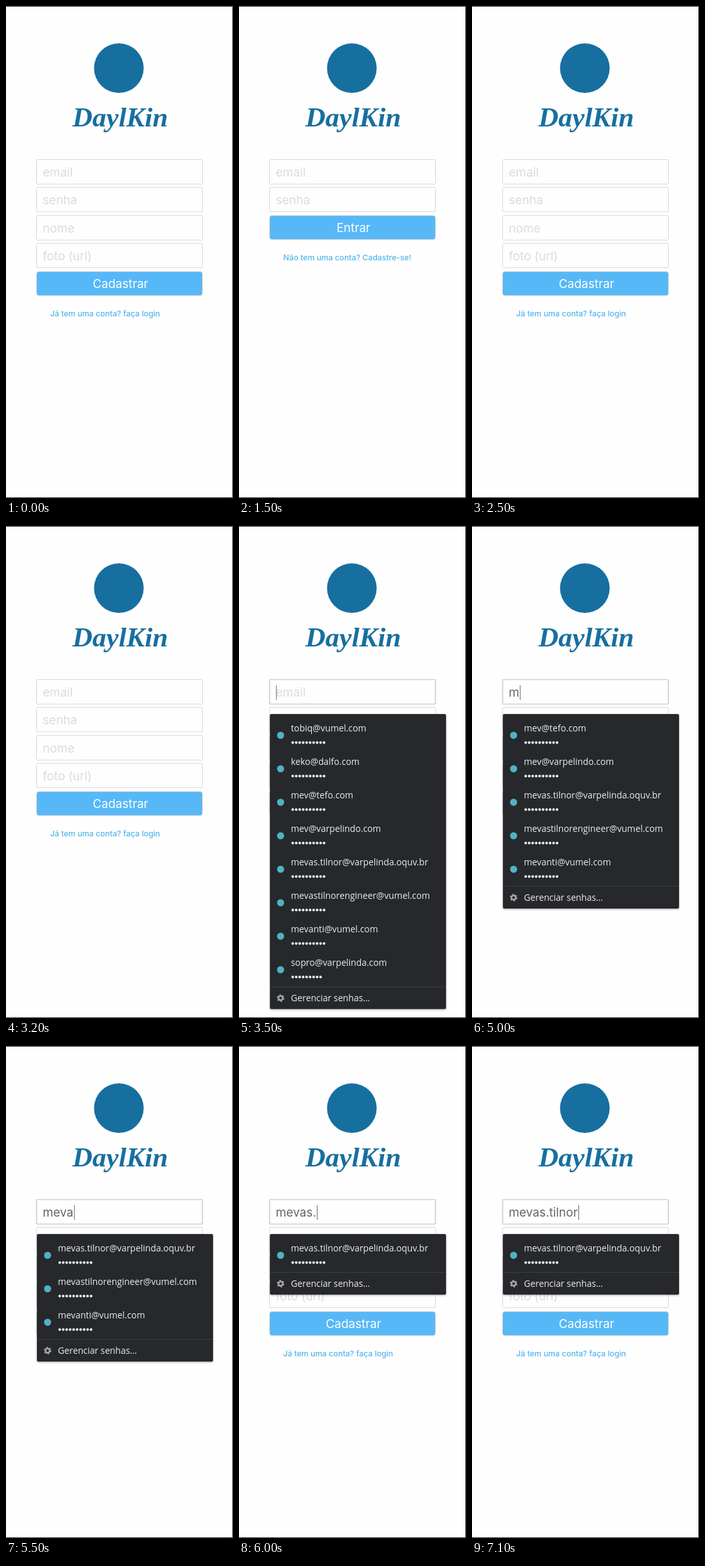
An HTML page for the animation above (8000 ms loop, 352x764 px).

```html
<!DOCTYPE html>
<html lang="pt-BR">
<head>
<meta charset="utf-8">
<title>Cadastro</title>
<style>
  html, body { margin: 0; width: 100%; height: 100%; overflow: hidden; background: #fefefe; }
  svg { display: block; width: 100%; height: 100%; }
  text { white-space: pre; }
  .wordmark { font: italic bold 43px "Liberation Serif", serif; fill: #176f9f; }
  .field { fill: #fefefe; stroke: #d9d9d9; }
  .field.focus { stroke: #cfcfcf; stroke-width: 1.7; }
  .ui { font: 18.6px Inter, sans-serif; }
  .hint { fill: #dbdbdb; }
  .typed { fill: #666; }
  .button { fill: #57b8f7; stroke: #c9cdd0; }
  .label { fill: #fff; text-anchor: middle; }
  .link { font: 500 12.2px Inter, sans-serif; fill: #52b6ec; }
  .menu { fill: #27282c; filter: drop-shadow(0 1px 1.5px #0006); }
  .entry { font: 13.8px "Open Sans", "Noto Sans", sans-serif; fill: #eceded; }
  .dots { stroke: #eceded; stroke-width: 4.2; stroke-linecap: round; stroke-dasharray: 0 5.4; }
  .gear { fill: none; stroke: #a5a6a9; }
</style>
</head>
<body>
<svg viewBox="0 0 352 764" preserveAspectRatio="none">
  <rect width="352" height="764" fill="#fefefe"/>
  <circle cx="175" cy="96.5" r="38.5" fill="#176f9f"/>
  <text class="wordmark" x="103" y="187">DaylKin</text>
  <g id="form"></g>
  <g id="menu"></g>
  <path d="M0 .5H351.5V763.5H0" fill="none" stroke="#2b2c2f"/>
</svg>
<script>
const LOOP = 8000;
const ROW = 52;
const ADDRESS = "mevas.tilnor";

const accounts = [
  "tobiq@vumel.com",
  "keko@dalfo.com",
  "mev@tefo.com",
  "mev@varpelindo.com",
  ADDRESS + "@varpelinda.oquv.br",
  "mevastilnorengineer@vumel.com",
  "mevanti@vumel.com",
  "sopro@varpelinda.com"
];

const pages = {
  signup: { fields: ["email", "senha", "nome", "foto (url)"], button: "Cadastrar", link: "Já tem uma conta? faça login" },
  login: { fields: ["email", "senha"], button: "Entrar", link: "Não tem uma conta? Cadastre-se!" }
};

const LOGIN_AT = 1300, SIGNUP_AT = 2500, FOCUS_AT = 3500;
const keyTimes = [4900, 5100, 5300, 5400, 5600, 5900, 6500, 6600, 6700, 6800, 6900, 7100];

const form = document.getElementById("form");
const menu = document.getElementById("menu");

// Rows sit on whole pixels so their outlines stay crisp.
const rowTop = i => Math.round(238 + i * 43.4) + .5;

function drawForm(page, focused, typed) {
  const fields = page.fields.map((name, i) => {
    const y = rowTop(i);
    const active = focused && i === 0;
    const filled = active && typed;
    return `<rect class="field${active ? " focus" : ""}" x="47.5" y="${y}" width="257" height="38" rx="1"/>
      <text class="ui ${filled ? "typed" : "hint"}" x="57" y="${y + 26.5}">${filled ? typed : name}</text>`;
  });
  const y = rowTop(page.fields.length);
  form.innerHTML = fields.join("") +
    `<rect class="button" x="47.5" y="${y}" width="257" height="37" rx="3.5"/>
     <text class="ui label" x="177.5" y="${y + 25.5}">${page.button}</text>
     <text class="link" x="68.5" y="${y + 69.5}">${page.link}</text>`;
  if (focused) {
    const x = typed ? 58 + form.querySelector(".typed").getComputedTextLength() : 57.5;
    form.innerHTML += `<rect x="${x}" y="247" width="1" height="23" fill="#666"/>`;
  }
}

function drawMenu(focused, typed) {
  if (!focused) {
    menu.innerHTML = "";
    return;
  }
  const matches = accounts.filter(name => name.startsWith(typed));
  const end = 299 + matches.length * ROW;
  const rows = matches.map((name, i) => {
    const y = 299 + i * ROW;
    const dots = name.startsWith("sopro") ? 9 : 10;
    return `<circle cx="64.5" cy="${y + 26}" r="5.5" fill="#4fb3c4"/>
      <text class="entry" x="80.5" y="${y + 20}">${name}</text>
      <path class="dots" d="M83.3 ${y + 37.3}h${(dots - 1) * 5.4 + .1}"/>`;
  });
  menu.innerHTML =
    `<rect class="menu" x="48" y="292" width="273" height="${end + 35 - 292}" rx="2"/>` +
    rows.join("") +
    `<path d="M48 ${end + .5}h273" stroke="#3d3e42"/>
     <circle class="gear" cx="64.5" cy="${end + 18}" r="3.3" stroke-width="2.4"/>
     <circle class="gear" cx="64.5" cy="${end + 18}" r="4.8" stroke-width="2" stroke-dasharray="2.5 2.53"/>
     <text class="entry" x="80.5" y="${end + 22.8}">Gerenciar senhas…</text>`;
}

let shown = "";
function render(now) {
  const t = now % LOOP;
  const page = t >= LOGIN_AT && t < SIGNUP_AT ? "login" : "signup";
  const focused = t >= FOCUS_AT;
  const typed = ADDRESS.slice(0, keyTimes.filter(k => k <= t).length);
  const state = [page, focused, typed].join();
  if (state !== shown) {
    shown = state;
    drawForm(pages[page], focused, typed);
    drawMenu(focused, typed);
  }
}

const start = performance.now();
function tick() {
  render(performance.now() - start);
  requestAnimationFrame(tick);
}
tick();
</script>
</body>
</html>
```
